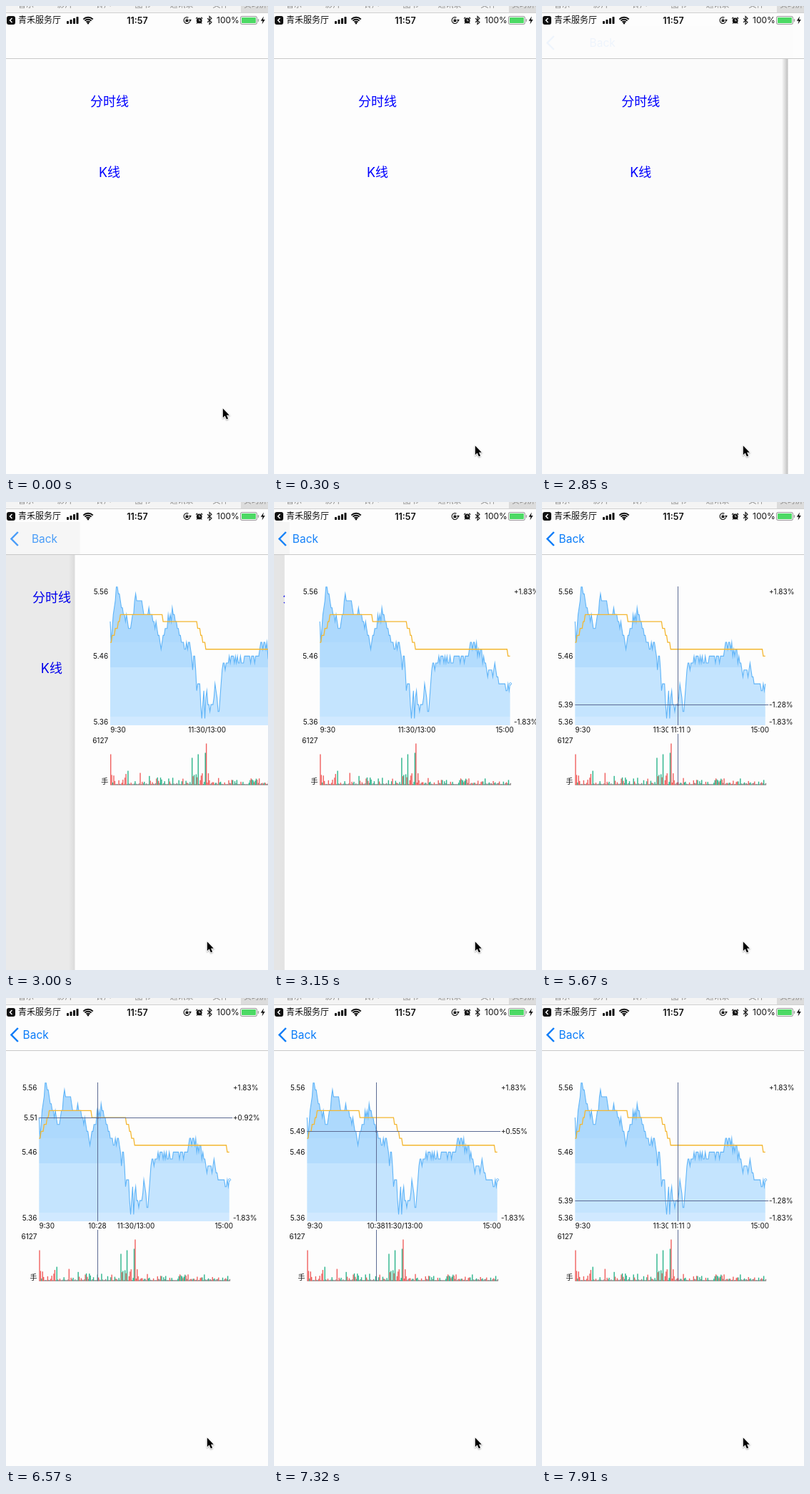
These frames come from a looping animation (367x654 px, 8 s). An HTML page with a canvas:

```html
<!DOCTYPE html>
<html lang="zh">
<head>
<meta charset="utf-8">
<style>
html, body { margin: 0; width: 100%; height: 100%; overflow: hidden; background: #fdfdfd; }
canvas { display: block; }
</style>
</head>
<body>
<canvas id="stage" width="367" height="654"></canvas>
<script>
const c = document.getElementById('stage').getContext('2d');
const LOOP = 8000, PAPER = '#fdfdfd', PAGE_W = 370, PUSH = 2850;
const LEFT = 46.3, MINUTE = 1.425, LAST = 187;
const TOP = 118.7, MID = 215.4, BOTTOM = 312, CENT = 9.67, VOL_BASE = 395.5;

// Turning points: [minute, cents above 5.46]
const priceKeys = [
  [0,5],[1,2],[6,10],[12,7],[20,4],[24,8],[31,8],[34,6],[41,6],[51,1.5],[54,4],[58,5],[62,6],[70,2],
  [79,1],[81,-2],[83,0],[85,-5],[88,-4],[90,-9],[92,-5],[93,-9],[95,-5],[97,-7],[101,-7],[103,-4],
  [107,-8],[111,-1],[140,0],[143,0],[146,0],[148,2],[156,1],[164,-2],[173,-2],[176,-4],[187,-4]];
const averageKeys = [[0,2],[9,5],[10,6],[51,6],[52,5],[84,5],[95,1],[184,1],[185,0],[187,0]];
// Tallest volume bars by minute
const peaks = { 0: 43, 80: 38, 86: 43, 93: 45, 94: 58 };
// Crosshair path: [ms, minute]
const drag = [[4620,146],[4920,140],[5070,140],[5670,101],[6570,58],[6870,51],[7170,60],[7910,101]];

const noise = i => { const v = Math.sin(i * 12.9898 + 4.1) * 43758.5453; return v - Math.floor(v); };
const minuteX = m => LEFT + m * MINUTE;
const levelY = cents => MID - cents * CENT;

function lerp(points, x) {
  const i = points.findIndex(p => p[0] >= x);
  if (i < 0) return points[points.length - 1][1];
  if (i === 0) return points[0][1];
  const [x0, y0] = points[i - 1], [x1, y1] = points[i];
  return y0 + (y1 - y0) * (x - x0) / (x1 - x0);
}

// Whole cents, with a tick of jitter between turning points
function price(m) {
  const jitter = priceKeys.some(k => k[0] === m) ? 0 : 1.7 * (noise(m) - 0.5);
  return Math.max(-9, Math.round(lerp(priceKeys, m) + jitter));
}

const series = level => Array.from({ length: LAST + 1 }, (_, m) => [minuteX(m), levelY(level(m))]);
const priceLine = series(price);
const averageLine = series(m => Math.round(lerp(averageKeys, m)));

function stepTime(t) {
  const at = n => 150 * n - 10 * [23, 28, 31, 53].filter(k => n >= k).length;
  let n = 53;
  while (at(n) > t) n--;
  return at(n);
}

function rect(x, y, w, h, color) { c.fillStyle = color; c.fillRect(x, y, w, h); }

function text(s, x, y, size, { color = '#111', align = 'left', weight = 400 } = {}) {
  c.font = `${weight} ${size}px Inter, "Noto Sans CJK SC", "Noto Sans CJK", sans-serif`;
  c.fillStyle = color;
  c.textAlign = align;
  c.fillText(s, x, y + size * 0.365);
}

function path(points, color, width) {
  c.beginPath();
  points.forEach(([x, y]) => c.lineTo(x, y));
  c.strokeStyle = color;
  c.lineWidth = width;
  c.stroke();
}

function shape(points, color) {
  c.beginPath();
  points.forEach(([x, y]) => c.lineTo(x, y));
  c.closePath();
  c.fillStyle = color;
  c.fill();
}

function arc(x, y, r, from, to, width, color = '#111') {
  c.beginPath();
  c.arc(x, y, r, from, to);
  c.strokeStyle = color;
  c.lineWidth = width;
  c.stroke();
}

function disc(x, y, r, color) {
  c.beginPath();
  c.arc(x, y, r, 0, 7);
  c.fillStyle = color;
  c.fill();
}

function rounded(x, y, w, h, r, color) {
  c.beginPath();
  c.roundRect(x, y, w, h, r);
  c.fillStyle = color;
  c.fill();
}

function topStrip() {
  rect(0, 0, 367, 9, '#f4f4f4');
  rect(329, 0, 38, 9, '#dcdcdc');
  rect(0, 9, 367, 1, '#d0d0d0');
  '音乐 影片 铃声 图书 通讯录 文件 实时屏幕'.split(' ')
    .forEach((s, i) => text(s, 28 + i * 54.5, -2, 11, { color: '#8c8c8c', align: 'center' }));
}

function statusBar() {
  rounded(1, 14, 12, 12, 3, '#111');
  path([[8.5, 17], [5.5, 20], [8.5, 23]], '#fff', 1.5);
  text('青禾服务厅', 17, 20, 12);
  for (let i = 0; i < 4; i++) rounded(85 + i * 4.5, 21 - i * 2, 3, 4 + i * 2, 0.8, '#111');
  for (let i = 0; i < 3; i++) arc(115, 25.2, 3.6 + i * 2.9, -2.36, -0.78, 1.9);
  disc(115, 24, 1.4, '#111');
  text('11:57', 184, 20, 12.5, { align: 'center', weight: 600 });

  // Rotation lock
  arc(253.5, 20, 4.4, -0.3, 5.2, 1.1);
  shape([[256, 19], [260, 19], [258, 21.5]], '#111');
  rect(251.5, 19.2, 4, 3, '#111');
  arc(253.5, 19, 1.2, Math.PI, 0, 0.8);

  // Alarm clock
  disc(270.7, 20.4, 3.9, '#111');
  for (const side of [-1, 1]) {
    path([[270.7 + side * 4.6, 17.6], [270.7 + side * 2.6, 15.7]], '#111', 1.2);
    path([[270.7 + side * 2.6, 23], [270.7 + side * 3.5, 24.8]], '#111', 1);
  }
  path([[270.7, 18], [270.7, 20.6], [272.6, 20.6]], '#fff', 0.8);

  // Bluetooth and battery
  path([[282, 17.2], [288, 22.8], [285, 25.5], [285, 14.5], [288, 17.2], [282, 22.8]], '#111', 1.1);
  text('100%', 295, 20, 12);
  rounded(328, 14, 24, 12, 3, '#999');
  rounded(329, 15, 22, 10, 2, PAPER);
  rounded(330, 16, 20, 8, 1, '#4cd964');
  rounded(352.8, 18, 1.4, 4, 0.7, '#999');
  shape([[361, 14.5], [356.8, 20.7], [359.6, 20.7], [358.6, 25.5], [362.8, 19], [360, 19]], '#111');
}

function menuPage(shift) {
  const blue = { color: '#00f', align: 'center' };
  text('分时线', 145 - shift, 133, 18, blue);
  text('K线', 145 - shift, 232, 18, blue);
}

function volume() {
  rect(LEFT, VOL_BASE - 1, LAST * MINUTE + 1, 1, '#8f8f8f');
  for (let m = 0; m <= LAST; m++) {
    const swell = 9 + 42 * Math.exp(-m / 18) + 16 * Math.exp(-(((m - 88) / 9) ** 2));
    const h = peaks[m] || 1 + swell * noise(m + 200) ** 3;
    const red = m in peaks ? m % 94 === 0 : noise(m + 500) < 0.5;
    const color = h < 3 ? '#8f8a8a' : red ? '#f0605f' : '#2bb48b';
    rect(minuteX(m), VOL_BASE - h, 1.4, h, color);
  }
}

// Shading falls in four flat bands, darkest on top
function bands() {
  const shade = c.createLinearGradient(0, TOP, 0, BOTTOM);
  let from = 0;
  for (const [to, color] of [[0.4, '#add9fd'], [0.58, '#b3dcfd'], [0.94, '#c4e4fe'], [1, '#d0e9ff']]) {
    shade.addColorStop(from, color);
    shade.addColorStop(to, color);
    from = to;
  }
  return shade;
}

function chart(t) {
  const [endX, endY] = priceLine[LAST];
  shape([[LEFT, BOTTOM], ...priceLine, [endX, BOTTOM]], bands());
  path(priceLine, '#5fb4f8', 1.1);
  path(averageLine, '#f4b731', 1.3);

  // Blinking end point
  const phase = (t + 1450) % 1780;
  c.globalAlpha = Math.min(1, Math.floor(phase / 145) / 3);
  disc(endX + 0.5, endY, 1.5, '#fff');
  arc(endX + 0.5, endY, 1.5, 0, 7, 0.9, '#5fb4f8');
  c.globalAlpha = 1;

  volume();
  const right = { align: 'right' };
  text('5.56', 43.5, 125, 10, right);
  text('5.46', 43.5, 215.7, 10, right);
  text('5.36', 43.5, 307, 10, right);
  text('+1.83%', 318, 125, 10);
  text('-1.83%', 318, 307, 10);
  text('9:30', 46.5, 318.7, 10);
  text('11:30/13:00', 182, 318.7, 10, { align: 'center' });
  text('15:00', 318, 318.7, 10, right);
  text('6127', 43.5, 333.5, 10, right);
  text('手', 43.5, 390, 10, right);
}

function crosshair(t) {
  if (t < drag[0][0]) return;
  const minute = Math.round(lerp(drag, t)), cents = price(minute);
  const x = Math.floor(minuteX(minute)), y = Math.round(levelY(cents));
  const clock = (minute < 120 ? 570 : 660) + minute;
  const ink = '#5d6c94';
  rect(x, 118, 1, 194, ink);
  rect(x, 324, 1, 71.5, ink);
  rect(LEFT, y, 271, 1, ink);
  disc(x + 0.5, y + 0.5, 1.5, ink);

  const labelY = Math.max(125, Math.min(307, y + 0.6));
  rect(21, labelY - 5.5, 23, 11, PAPER);
  rect(318, labelY - 5.5, 36, 11, PAPER);
  text((5.46 + cents / 100).toFixed(2), 43.5, labelY, 10, { align: 'right' });
  text((cents > 0 ? '+' : '') + (cents / 5.46).toFixed(2) + '%', 318, labelY, 10);
  rect(x - 13, 313, 26.5, 11, PAPER);
  text(Math.floor(clock / 60) + ':' + String(clock % 60).padStart(2, '0'), x, 318.7, 10, { align: 'center' });
}

function navBar(offset, dim) {
  rect(0, 28, offset + 4, 45, `rgba(0,0,0,${dim * 0.35})`);
  c.globalAlpha = 1 - offset / PAGE_W;
  path([[16.8, 42], [7.5, 51.5], [16.8, 61]], '#0a7cf8', 2.5);
  text('Back', 23.6 + offset * 0.1236, 51.5, 15.5, { color: '#0a7cf8' });
  c.globalAlpha = 1;
}

function cursor(t) {
  const move = Math.min(2, Math.floor(t / 150)) / 2;
  const arrow = [[0, 0], [0, 14.5], [3.3, 11.5], [5.8, 17], [8.3, 15.9], [5.9, 10.6], [10.2, 10.4], [0, 0]];
  c.save();
  c.translate(303.8 - 22 * move, 562.5 + 52 * move);
  c.scale(0.88, 0.88);
  c.shadowColor = 'rgba(0,0,0,.35)';
  c.shadowBlur = 2;
  c.shadowOffsetY = 1;
  path(arrow, '#fff', 1.8);
  c.shadowColor = 'transparent';
  shape(arrow, '#000');
  c.restore();
}

function pushedPage(t, offset) {
  const edge = offset - 3, dim = 0.1 * (1 - offset / PAGE_W);
  if (edge > 0) {
    rect(0, 73, edge, 581, `rgba(0,0,0,${dim})`);
    const shadow = c.createLinearGradient(edge - 9, 0, edge, 0);
    shadow.addColorStop(0, 'rgba(0,0,0,0)');
    shadow.addColorStop(1, `rgba(0,0,0,${0.26 * offset / PAGE_W})`);
    rect(edge - 9, 73, 9, 581, shadow);
  }
  rect(edge, 73, 372, 581, PAPER);
  c.save();
  c.translate(offset, 0);
  chart(t);
  crosshair(t);
  c.restore();
  navBar(offset, edge > 0 ? dim : 0);
}

function draw(t) {
  // Critically damped slide
  const u = Math.max(0, (t - PUSH + 27) * 0.01463);
  const offset = PAGE_W * (1 + u) * Math.exp(-u);
  rect(0, 0, 367, 654, PAPER);
  menuPage(t < PUSH ? 0 : 0.3 * (PAGE_W - offset));
  if (t >= PUSH) pushedPage(t, offset);
  rect(0, 73, 367, 1, '#c9c9c9');
  topStrip();
  statusBar();
  cursor(t);
}

function frame(now) {
  draw(stepTime(now % LOOP));
  requestAnimationFrame(frame);
}
requestAnimationFrame(frame);
</script>
</body>
</html>
```
